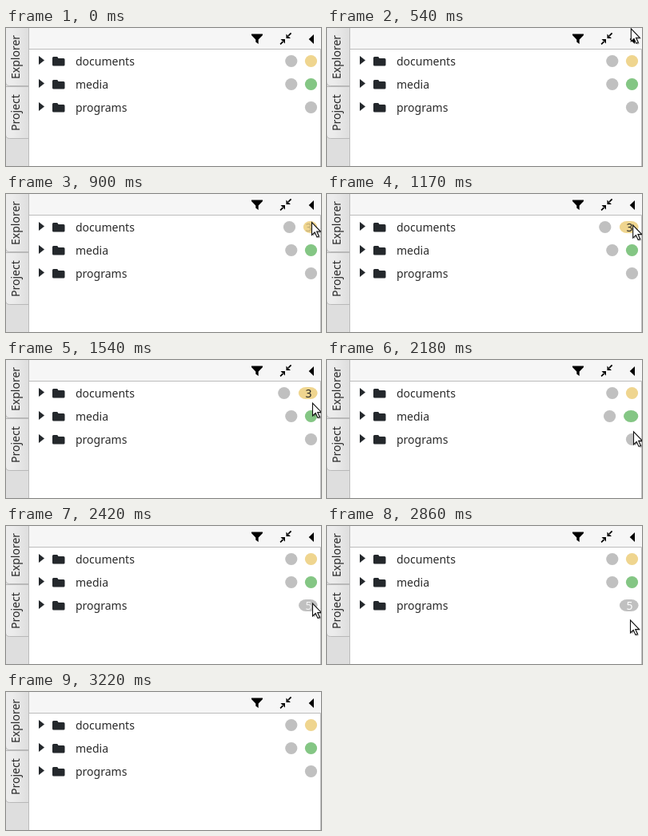
An HTML page that plays this animation: 394x173 px, repeating every 4.02 s.

```html
<!DOCTYPE html>
<html lang="en">
<head>
<meta charset="utf-8">
<title>File explorer badges</title>
<style>
  html, body { margin: 0; width: 100%; height: 100%; overflow: hidden; background: #fff; }
  svg { display: block; width: 394px; height: 173px; }
  text { font: 14px "Noto Sans", "Open Sans", sans-serif; fill: #2a2a2a; }
</style>
</head>
<body>
<svg viewBox="0 0 394 173">
  <defs>
    <linearGradient id="tab"><stop offset=".3" stop-color="#ececec"/><stop offset="1" stop-color="#dedede"/></linearGradient>
    <g id="node" fill="#24282c">
      <path d="M41 35l7 5.500-7 5.500z"/>
      <path d="M58 37.500q0-1.500 1.500-1.500h4q1 0 1.500 1l.5 1H72q1.500 0 1.500 1.500V46q0 1.500-1.500 1.500H59.500q-1.500 0-1.500-1.500z"/>
    </g>
    <path id="arrow" d="M0 0V16l3.700-3.500 2.800 6 2.500-1-2.800-6H11z"/>
  </defs>

  <rect width="28" height="173" fill="#dedede"/>
  <g fill="url(#tab)" stroke="#b8b8b8">
    <path d="M28 72.500H4.500q-5 0-5-5V-.5H28"/>
    <path d="M28 138.500H4.500q-5 0-5-5V73.500H28"/>
  </g>
  <text transform="translate(17 64) rotate(-90)">Explorer</text>
  <text transform="translate(17 129) rotate(-90)">Project</text>

  <rect x="28" width="366" height="26" fill="#f6f6f6"/>
  <path d="M28.500 0V173M28 26.500H393.500V173" fill="none" stroke="#bcbcbc"/>
  <path d="M307 7.500h14V9l-5.300 5.500V20l-3.400-2.500v-3L307 9z"/>
  <path d="M385 8v12l-6.300-6z"/>
  <path d="M350.500 7.500V13H356zM349 14h-5.500L349 19.500zM356 5.800l1.200 1.200-4 4-1.200-1.200zM346.300 16l1.200 1.200-3.800 3.800-1.200-1.200z"/>

  <g id="rows"></g>
  <g id="cursor">
    <use href="#arrow" x="1.500" y="1.500" opacity=".3"/>
    <use href="#arrow" fill="#fff" stroke="#111" stroke-width="1.100"/>
  </g>
</svg>
<script>
const LOOP = 4020, GREY = '#c0c0c0';
const rows = [
  { name: 'documents', count: 3, fill: '#efd58f', ink: '#222', open: 865, close: 1560, extra: true },
  { name: 'media', count: 1, fill: '#84c684', ink: '#fff', open: 1620, close: 2080, extra: true },
  { name: 'programs', count: 5, fill: GREY, ink: '#fff', open: 2225, close: 2900 }
];
// Pointer tip: time, x, y
const path = [
  [360, 379, -20], [840, 382.5, 35.5], [1120, 382.5, 35.5], [1380, 383.5, 54], [1550, 383.5, 54],
  [1700, 383.5, 68], [1970, 383.5, 68], [2200, 383.5, 92], [2420, 383.5, 97], [2480, 382.5, 102],
  [2540, 380.5, 107], [2700, 380.5, 107], [2860, 379.5, 118], [3190, 376, 175]
];
const $ = id => document.getElementById(id);
const ramp = (t, start, length) => Math.min(1, Math.max(0, (t - start) / length));
const ease = u => 1 - (1 - u) ** 1.7;

$('rows').innerHTML = rows.map((r, i) => `<g transform="translate(0 ${i * 29})">
  <use href="#node"/><text x="87" y="47">${r.name}</text>
  ${r.extra ? `<circle class="extra" cy="41.500" r="7.600" fill="${GREY}"/>` : ''}
  <rect class="pill" y="33.900" height="15.200" rx="9" ry="7.600" fill="${r.fill}"/>
  <text class="count" x="378.500" y="47" text-anchor="middle" style="fill:${r.ink}">${r.count}</text></g>`).join('');
rows.forEach((r, i) => {
  const g = $('rows').children[i];
  r.dot = g.querySelector('.extra');
  r.pill = g.querySelector('.pill');
  r.label = g.querySelector('.count');
});

function pointer(t) {
  let i = 1;
  while (i < path.length - 1 && path[i][0] < t) i++;
  const [t0, x0, y0] = path[i - 1], [t1, x1, y1] = path[i];
  const u = ramp(t, t0, t1 - t0);
  return [x0 + (x1 - x0) * u, y0 + (y1 - y0) * u];
}

function draw(t) {
  for (const r of rows) {
    const p = ease(ramp(t, r.open, 220)) - ease(ramp(t, r.close, 220));
    r.pill.setAttribute('x', 373.9 - 8 * p);
    r.pill.setAttribute('width', 15.2 + 8.5 * p);
    if (r.dot) r.dot.setAttribute('cx', 356.8 - 9 * p);
    r.label.setAttribute('opacity', ramp(t, r.open - 20, 260) * (1 - ramp(t, r.close, 90)));
  }
  $('cursor').setAttribute('transform', `translate(${pointer(t)})`);
}

let start;
function tick(now) {
  start ??= now;
  draw((now - start) % LOOP);
  requestAnimationFrame(tick);
}
draw(0);
requestAnimationFrame(tick);
</script>
</body>
</html>
```
